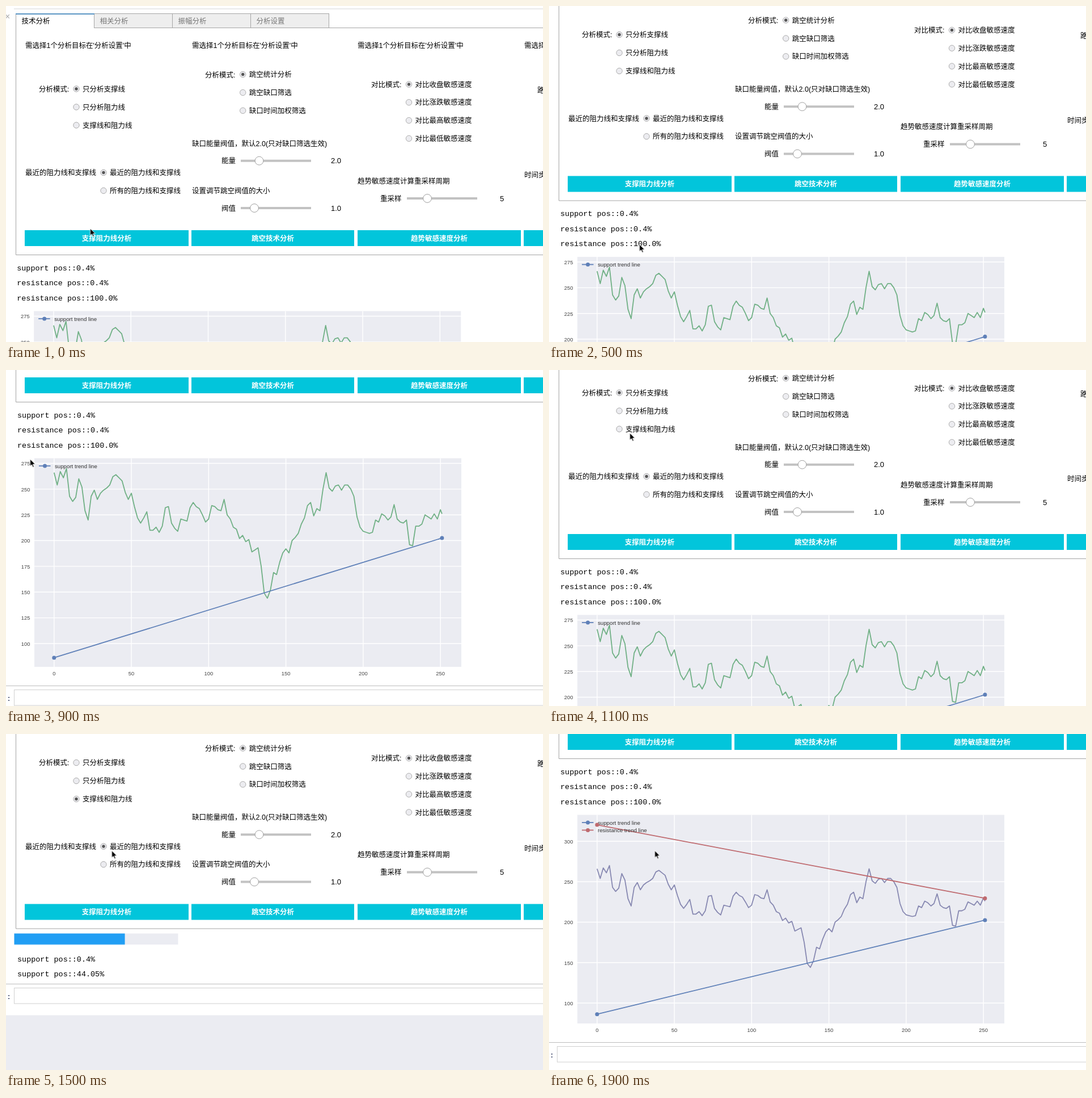
An HTML page that plays this animation: 947x592 px, repeating every 2 s.

```html
<!DOCTYPE html>
<html lang="zh">
<head>
<meta charset="utf-8">
<title>技术分析</title>
<style>
html, body { margin: 0; width: 100%; height: 100%; overflow: hidden; background: #fff; }
svg { display: block; }
text { font: 12.5px "Liberation Sans", "Noto Sans CJK SC", "Noto Sans CJK", sans-serif; fill: #000; white-space: pre; }
.num { font-size: 13px; }
.tab { fill: #757575; }
.btn { font-weight: bold; fill: #fff; text-anchor: middle; }
.log { font: 13.45px "Liberation Mono", monospace; }
.tick { font-size: 9.4px; fill: #444; }
.legend { font-size: 9.7px; fill: #333; }

/* Every part moves in hard steps of 100 ms (5 %). */
.page, .cursor, .arrow, .ibeam, .first, .second, .run, .fill, .early, .late, .only, .both, .cover {
  animation: 2s step-end infinite;
}
.page { animation-name: scroll; }
.cursor { animation-name: point; }
.arrow { animation-name: arrow; }
.ibeam { animation-name: ibeam; }
.first { animation-name: first; }
.second { animation-name: second; }
.run { animation-name: run; }
.fill { animation-name: fill; }
.early { animation-name: early; }
.late { animation-name: late; }
.only { animation-name: only; }
.both { animation-name: both; }
.cover { animation-name: cover; }

@keyframes scroll {
  0%, 5% { transform: translateY(0); }
  10%, 25% { transform: translateY(-95.5px); }
  30% { transform: translateY(-283px); }
  35% { transform: translateY(-340px); }
  40%, 45% { transform: translateY(-382px); }
  50% { transform: translateY(-250px); }
  55%, 60% { transform: translateY(-106px); }
  65% { transform: translateY(-197px); }
  70%, 85% { transform: translateY(-95.5px); }
  90% { transform: translateY(-300px); }
  95%, 100% { transform: translateY(-395px); }
}
@keyframes point {
  0% { transform: translate(148.5px, 392px); }
  5%, 35% { transform: translate(159.5px, 420px); }
  40% { transform: translate(100px, 290px); }
  45% { transform: translate(42.5px, 157px); }
  50% { transform: translate(95px, 130px); }
  55% { transform: translate(142.5px, 111px); }
  60% { transform: translate(124px, 103px); }
  65%, 100% { transform: translate(186.5px, 205.5px); }
}
@keyframes arrow { 0%, 45% { visibility: visible; } 30% { visibility: hidden; } }
@keyframes ibeam { 0%, 45% { visibility: hidden; } 30% { visibility: visible; } }
@keyframes first {
  0% { visibility: visible; transform: translateX(-.8px); }
  10%, 70%, 100% { visibility: hidden; transform: none; }
  25% { visibility: visible; transform: none; }
}
@keyframes second { 0% { visibility: hidden; } 85%, 100% { visibility: visible; } }
@keyframes run { 0%, 25%, 85%, 100% { visibility: hidden; } 10%, 70% { visibility: visible; } }
@keyframes fill {
  0%, 10% { transform: scaleX(0); }
  15% { transform: scaleX(.04); }
  20% { transform: scaleX(.5); }
  70% { transform: scaleX(.3); }
  75% { transform: scaleX(.676); }
  80%, 100% { transform: scaleX(.95); }
}
@keyframes early { 0% { opacity: 1; } 50%, 100% { opacity: 0; } }
@keyframes late { 0% { opacity: 0; } 50%, 100% { opacity: 1; } }
@keyframes only { 0% { visibility: visible; } 60%, 100% { visibility: hidden; } }
@keyframes both { 0% { visibility: hidden; } 60%, 100% { visibility: visible; } }
@keyframes cover { 0%, 35%, 100% { visibility: hidden; } 30% { visibility: visible; } }
</style>
</head>
<body>
<svg id="stage" width="947" height="592" viewBox="0 0 947 592"></svg>
<script>
const BLUE = '#5f80b8', GREEN = '#70b085', RED = '#bf6a6f', PURPLE = '#8788b1', PALE = '#ebecf2';

// Closing prices, every second day, then the last day.
const prices = [
  266, 254, 267, 261, 270, 243, 238, 242, 260, 252, 229, 220, 243, 249, 240, 246, 249, 251,
  254, 262, 264, 261, 258, 247, 240, 246, 233, 222, 217, 222, 228, 210, 210, 213, 208, 214,
  232, 233, 217, 212, 209, 221, 220, 219, 232, 237, 233, 231, 225, 218, 221, 234, 233, 230,
  229, 240, 225, 221, 213, 211, 202, 205, 199, 201, 189, 191, 193, 175, 149, 144, 152, 169,
  167, 179, 188, 192, 188, 200, 203, 207, 216, 222, 234, 237, 224, 231, 229, 250, 266, 251,
  248, 253, 254, 249, 254, 254, 250, 243, 223, 213, 209, 208, 207, 208, 220, 218, 226, 224,
  220, 223, 235, 221, 218, 217, 220, 196, 195, 214, 214, 216, 225, 223, 221, 226, 221, 230, 226
];

const text = (x, y, s, cls = '', extra = '') =>
  `<text x="${x}" y="${y + 4.6}" class="${cls}" ${extra}>${s}</text>`;
const rect = (x, y, w, h, fill, stroke = 'none') =>
  `<rect x="${x}" y="${y}" width="${w}" height="${h}" fill="${fill}" stroke="${stroke}"/>`;
const line = (x1, y1, x2, y2, color, width = 1) =>
  `<path d="M${x1} ${y1}L${x2} ${y2}" stroke="${color}" stroke-width="${width}"/>`;
const dot = (x, y, r, fill, extra = '') => `<circle cx="${x}" cy="${y}" r="${r}" fill="${fill}" ${extra}/>`;
const log = (...rows) => rows.map((s, i) => text(20, 461 + i * 26.6, s, 'log')).join('');

const radio = (x, y, label, mark = '') =>
  dot(x, y, 5.2, '#ececf0', 'stroke="#aaa"') +
  (mark && dot(x, y, 2.7, '#555', `class="${mark}"`)) +
  text(x + 11, y, label);

const slider = (x, y, knob, label, labelX, value, valueX) =>
  text(labelX, y, label) + line(x, y, x + 124, y, '#c2c2c2', 4) +
  dot(knob, y, 7.4, '#fff', 'stroke="#9e9e9e"') + text(valueX, y, value, 'num');

const button = (x, w, label) => rect(x, 395, w, 28, '#02c5db') + text(x + w / 2, 409, label, 'btn');

function panel() {
  const tabs = ['技术分析', '相关分析', '振幅分析', '分析设置'].map((name, i) => {
    const x = 17.5 + i * 138;
    return i
      ? rect(x, 13.5, 138, 25, '#eee', '#a5a5a5') + text(x + 10, 26, name, 'tab')
      : text(x + 10, 26, name);
  }).join('');
  const hint = [34, 328, 620, 914].map(x => text(x, 69, "需选择1个分析目标在'分析设置'中")).join('');
  return line(14, 5, 947, 5, '#d5d5d5') + text(-2, 19, '×', '', 'style="font-size:16px;fill:#aaa"') +
    tabs + `<path d="M155.5 38.5H960V438.5H17.5V14H155.5" fill="none" stroke="#a5a5a5"/>` +
    line(17, 14, 156, 14, '#5b95c4', 2) + hint +
    text(58, 146, '分析模式:') +
    radio(124, 146, '只分析支撑线', 'only') + radio(124, 178, '只分析阻力线') +
    radio(124, 210, '支撑线和阻力线', 'both') +
    text(34, 293.5, '最近的阻力线和支撑线') +
    radio(172, 293.5, '最近的阻力线和支撑线', 'on') + radio(172, 325.3, '所有的阻力线和支撑线') +
    text(351, 121, '分析模式:') +
    radio(417.7, 120.5, '跳空统计分析', 'on') + radio(417.7, 152.5, '跳空缺口筛选') +
    radio(417.7, 184.3, '缺口时间加权筛选') +
    text(328, 242, '缺口能量阀值，默认2.0(只对缺口筛选生效)') +
    slider(414, 272.7, 446.5, '能量', 380, '2.0', 573) +
    text(328, 325.3, '设置调节跳空阀值的大小') +
    slider(414, 356, 438, '阀值', 380, '1.0', 573) +
    text(644, 138, '对比模式:') +
    ['收盘', '涨跌', '最高', '最低'].map((s, i) =>
      radio(710.5, 138 + i * 31.8, `对比${s}敏感速度`, i ? '' : 'on')).join('') +
    text(620, 308, '趋势敏感速度计算重采样周期') +
    slider(707, 339, 743, '重采样', 660, '5', 871) +
    text(937, 148, '路径') + text(914, 297, '时间步长') +
    button(33, 289, '支撑阻力线分析') + button(327, 287, '跳空技术分析') +
    button(620, 288, '趋势敏感速度分析') + button(913, 288, '');
}

// The next, empty input cell below an output.
const nextCell = y =>
  line(0, y, 947, y, '#bdbdbd') + rect(14.5, y + 7, 960, 27.5, '#fff', '#d0d0d0') +
  text(3, y + 22, ':', '', 'style="font-weight:bold;fill:#333b60"') + rect(0, y + 55, 947, 400, PALE);

function plot(labels, topY, scale, color, trends) {
  const px = day => 84.8 + day * 2.7253;
  const py = price => topY + (labels[0] - price) * scale;
  const days = [0, 50, 100, 150, 200, 250];
  const curve = prices.map((p, i) => `${px(Math.min(2 * i, 251)).toFixed(1)},${py(p).toFixed(1)}`).join(' ');
  return rect(50, 537.5, 753, 367.5, PALE) +
    days.map(d => line(px(d), 537.5, px(d), 905, '#fff', 1.4) +
      text(px(d), 915.3, d, 'tick', 'text-anchor="middle"')).join('') +
    labels.map(p => line(50, py(p), 803, py(p), '#fff', 1.4) +
      text(42.5, py(p) - .8, p, 'tick', 'text-anchor="end"')).join('') +
    `<polyline points="${curve}" fill="none" stroke="${color}" stroke-width="1.8" stroke-linejoin="round"/>` +
    trends.map(([name, tint, from, to], i) => {
      const y = 551 + i * 13.4;
      return line(px(0), py(from), px(251), py(to), tint, 1.8) +
        dot(px(0), py(from), 3.5, tint) + dot(px(251), py(to), 3.5, tint) +
        line(58, y, 78.5, y, tint, 1.8) + dot(68.5, y, 3.5, tint) +
        text(86, y - .9, `${name} trend line`, 'legend');
    }).join('');
}

const support = ['support', BLUE, 86.2, 202.5];
const resistance = ['resistance', RED, 320.3, 229.5];
const results = log('support pos::0.4%', 'resistance pos::0.4%', 'resistance pos::100.0%') + nextCell(938.5);

const progress = rect(14.5, 447, 289, 19.5, PALE) +
  `<g transform="translate(14.5 447)"><rect class="fill" width="289" height="19.5" fill="#219ef4"/></g>` +
  text(20, 491.5, 'support pos::0.4%', 'log') +
  text(20, 518, 'resistance pos::0.4%', 'log early') +
  text(20, 518, 'support pos::44.05%', 'log late') + nextCell(536);

const cursor =
  `<path class="arrow" d="M0 0V12.5L2.9 9.8L5 14.4L7 13.5L5 9.1H9Z" stroke="#fff" stroke-width=".9"/>
   <path class="ibeam" d="M-3 -4.5Q0 -4.5 .5 -3Q1 -4.5 4 -4.5M.5 -3V7M-3 8.5Q0 8.5 .5 7Q1 8.5 4 8.5M-1 2H2" fill="none" stroke="#222" stroke-width="1.2"/>`;

document.getElementById('stage').innerHTML =
  `<g class="page">${panel()}
     <g class="first">${results}${plot([275, 250, 225, 200, 175, 150, 125, 100], 546.5, 1.814, GREEN, [support])}</g>
     <g class="run">${progress}</g>
     <g class="second">${results}${plot([300, 250, 200, 150, 100], 584, 1.425, PURPLE, [support, resistance])}</g>
   </g>
   <g class="cover">${rect(0, 585, 947, 7, '#fff')}${line(0, 591.5, 947, 591.5, '#e4e4e4')}</g>
   <g class="cursor">${cursor}</g>`;
</script>
</body>
</html>
```
